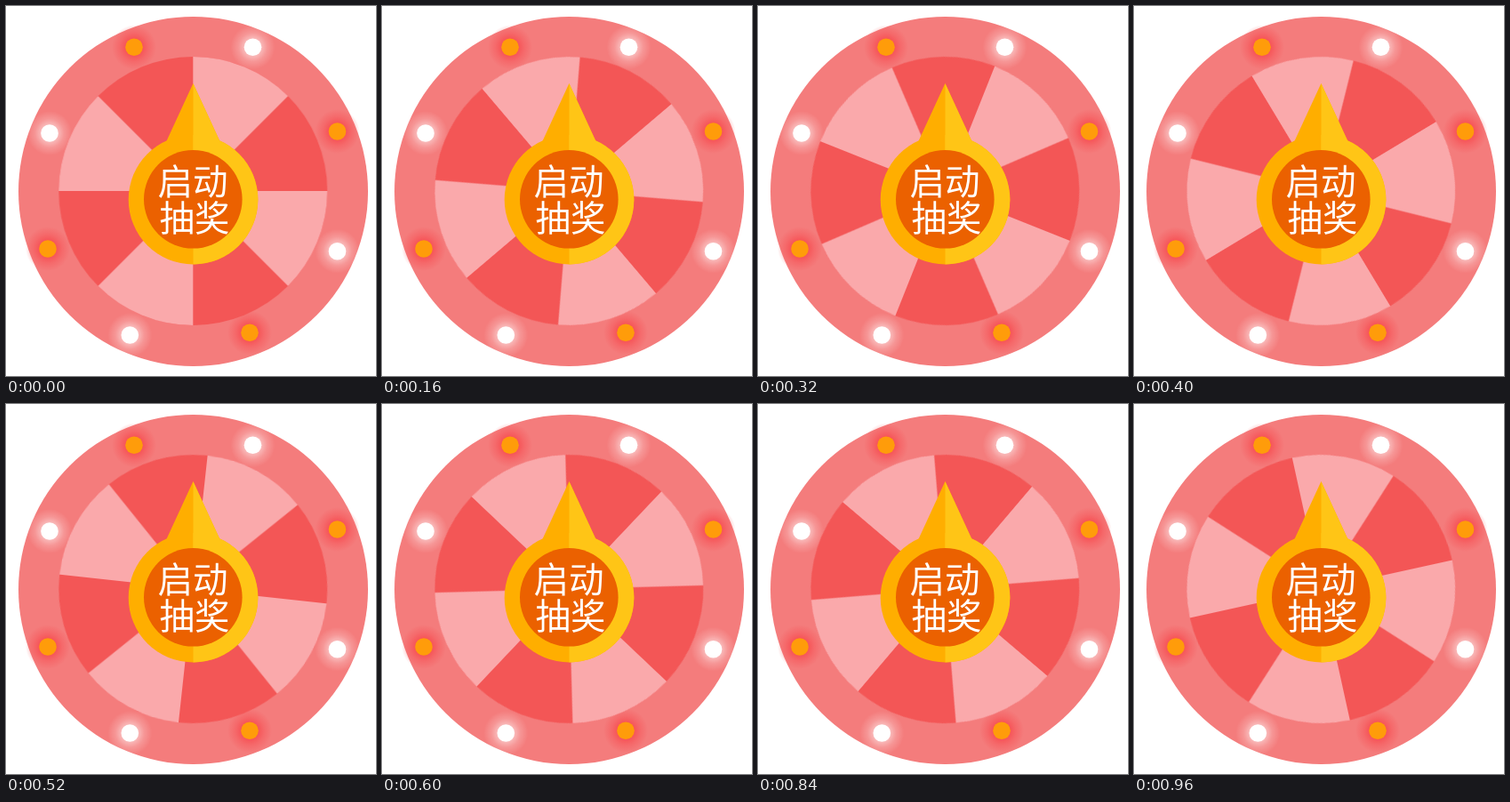
Animation of 416 by 416 pixels, one loop 1 s. Source, as an HTML page:

```html
<!DOCTYPE html>
<html lang="zh">
<head>
<meta charset="utf-8">
<title>启动抽奖</title>
<style>
  html, body { margin: 0; width: 100%; height: 100%; overflow: hidden; background: #fff; }
  svg { display: block; width: 100vw; height: 100vh; }
  text { font: 400 39.5px "Noto Sans CJK SC", "Noto Sans CJK", "Noto Sans CJK JP", sans-serif; fill: #fff; }

  /* The wheel advances 1/29 turn every 40 ms, plus one extra notch every 200 ms. */
  .spin, .skip { transform-origin: 0 0; }
  .spin { animation: spin 1s steps(25) infinite; }
  .skip { animation: skip 1s steps(5) infinite; }
  @keyframes spin { from { transform: rotate(0deg); } to { transform: rotate(calc(25 * 360deg / 29)); } }
  @keyframes skip { from { transform: rotate(0deg); } to { transform: rotate(calc(5 * 360deg / 29)); } }
</style>
</head>
<body>
<svg viewBox="0 0 416 416">
  <defs>
    <radialGradient id="pale">
      <stop offset=".3" stop-color="#fff" stop-opacity=".55"/>
      <stop offset=".65" stop-color="#fff" stop-opacity=".2"/>
      <stop offset="1" stop-color="#fff" stop-opacity="0"/>
    </radialGradient>
    <radialGradient id="red">
      <stop offset=".3" stop-color="#f74a4e" stop-opacity=".9"/>
      <stop offset=".65" stop-color="#f74a4e" stop-opacity=".38"/>
      <stop offset="1" stop-color="#f74a4e" stop-opacity="0"/>
    </radialGradient>
    <g id="white-bulb">
      <circle r="25" fill="url(#pale)"/>
      <circle r="9.8" fill="#fff"/>
    </g>
    <g id="amber-bulb">
      <circle r="25" fill="url(#red)"/>
      <circle r="9.8" fill="#ff9c0a"/>
    </g>
    <path id="slice" d="M0 0V-151A151 151 0 0 1 106.77 -106.77Z" fill="#faa9ab"/>
    <g id="pointer">
      <circle cx="210.5" cy="217.7" r="72.8"/>
      <path d="M210.4 87L246.4 165H174.4Z"/>
    </g>
    <clipPath id="right"><path d="M210.5 80H300V300H210.5Z"/></clipPath>
  </defs>

  <circle cx="210.5" cy="208.5" r="196.5" fill="#f47c7c"/>

  <use href="#amber-bulb" x="144" y="46.3"/>
  <use href="#amber-bulb" x="372.5" y="141"/>
  <use href="#amber-bulb" x="47" y="273"/>
  <use href="#amber-bulb" x="274" y="367.3"/>
  <use href="#white-bulb" x="277.5" y="46.3"/>
  <use href="#white-bulb" x="49" y="143"/>
  <use href="#white-bulb" x="372.5" y="275.7"/>
  <use href="#white-bulb" x="139.3" y="370"/>

  <g transform="translate(210.3 208)">
    <g class="spin"><g class="skip">
      <circle r="151" fill="#f35656"/>
      <use href="#slice"/>
      <use href="#slice" transform="rotate(90)"/>
      <use href="#slice" transform="rotate(180)"/>
      <use href="#slice" transform="rotate(270)"/>
    </g></g>
  </g>

  <use href="#pointer" fill="#ffae00"/>
  <use href="#pointer" fill="#ffc516" clip-path="url(#right)"/>
  <circle cx="210.3" cy="217.3" r="55.3" fill="#eb6100"/>
  <text x="170.5" y="212.3">启动</text>
  <text x="172.5" y="253">抽奖</text>
</svg>
</body>
</html>
```
